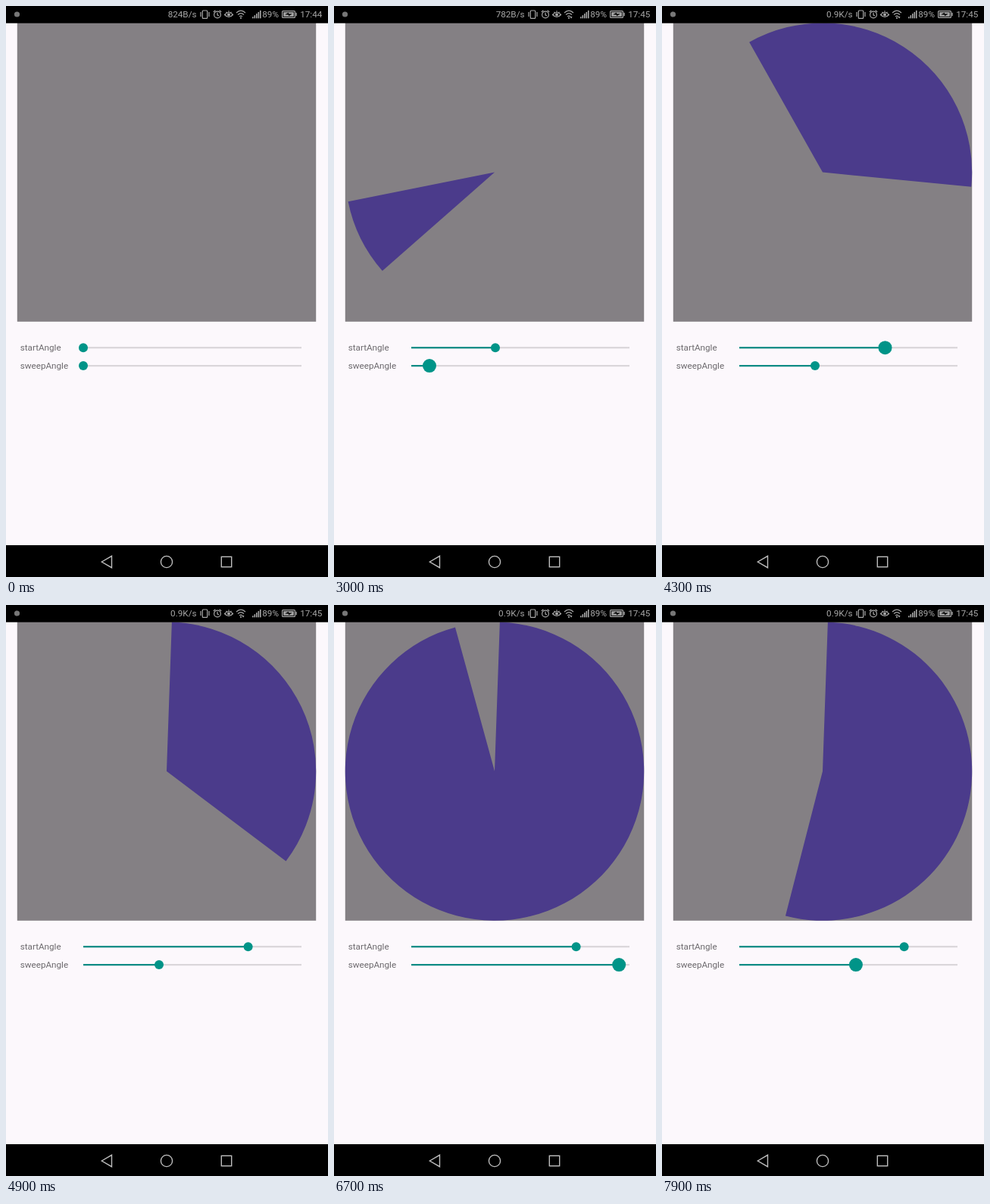
These frames come from a looping animation (425 by 754 pixels, 8 s). An HTML page:

```html
<!DOCTYPE html>
<html lang="en">
<head>
<meta charset="utf-8">
<title>Arc angles</title>
<style>
  html, body { margin: 0; width: 100%; height: 100%; overflow: hidden; background: #fcf8fc; }
  svg { display: block; width: 100vw; height: 100vh; }
  text { font-family: Roboto, "Open Sans", sans-serif; font-size: 11.7px; }
  .status text { fill: #a8a8a8; }
  .label { fill: #6c696d; }
  .line { fill: none; stroke: #a8a8a8; stroke-width: 1.2; }
  .nav { fill: none; stroke: #bdbdbd; stroke-width: 1.4; }
</style>
</head>
<body>
<svg viewBox="0 0 425 754" xmlns="http://www.w3.org/2000/svg">
  <rect width="425" height="754" fill="#fcf8fc"/>
  <rect x="14.8" y="22" width="394.4" height="394.8" fill="#848084"/>
  <path id="fan" fill="#4b3b8b"/>

  <g class="status">
    <rect width="425" height="22.7"/>
    <circle cx="14.5" cy="11" r="3.6" fill="#777"/>
    <text id="rate" x="251.5" y="15.2" text-anchor="end"></text>
    <g class="line">
      <rect x="259.3" y="6" width="6.4" height="10.4" rx="1"/>
      <path d="M257 8v6M268 8v6"/>
      <circle cx="279" cy="11.5" r="4.4"/>
      <path d="M279 8.8v3l2 1.2M273.8 8l2.6-2.3M284.2 8l-2.6-2.3"/>
      <path d="M288.5 11.5q5.500-6 11 0q-5.500 6-11 0zM290.500 7.800l1 1.400M294 6.200v1.600M297.500 7.800l-1 1.400"/>
      <path d="M304 9q6-5.600 12 0M306 11.500q4-3.600 8 0M308 13.900q2-1.700 4 0"/>
    </g>
    <circle cx="294" cy="11.5" r="1.9" fill="#a8a8a8"/>
    <circle cx="310" cy="15.8" r="1.1" fill="#a8a8a8"/>
    <path id="traffic" d="M311.500 14h3l-1.500 2.800z" fill="#a8a8a8"/>
    <g id="signal" fill="#a8a8a8"></g>
    <text x="338.3" y="15.2">89%</text>
    <rect class="line" x="364.600" y="6.600" width="16.800" height="8.800" rx="1"/>
    <rect x="366.200" y="8.200" width="13.600" height="5.600" fill="#a8a8a8"/>
    <path d="M368 11.300l5-2.600v1.600l5 .3-5 2.700v-1.600z"/>
    <rect x="382.400" y="8.800" width="1.400" height="4.400" fill="#a8a8a8"/>
    <text id="clock" x="417.300" y="15.200" text-anchor="end"></text>
  </g>

  <text class="label" x="18.700" y="455">startAngle</text>
  <text class="label" x="18.700" y="479">sweepAngle</text>
  <g id="sliders"></g>

  <rect y="712" width="425" height="42"/>
  <g class="nav">
    <path d="M126.300 734L139.500 726.300V741.700Z"/>
    <circle cx="212" cy="734" r="7.600"/>
    <rect x="284.300" y="727.300" width="13.400" height="13.400"/>
  </g>
</svg>
<script>
const LOOP = 8000, STEP = 100;
const CX = 212, CY = 219.6, R = 197.2;
const TRACK_X = 102, PX_PER_DEG = 0.8;
const SMALL = 6, BIG = 9;

// [time in ms, value] pairs
const startKeys = [
  [1200, 0], [1400, 18], [1800, 128], [1900, 138.7],
  [3900, 138.7], [4100, 180], [4300, 240.6], [4600, 268], [4700, 272]
];
const sweepKeys = [
  [2800, 0], [3000, 30], [3500, 203.9], [3600, 226], [3700, 206], [3900, 125],
  [5000, 125], [5100, 111], [5200, 148], [5300, 196], [5400, 251.6],
  [5900, 266], [6700, 342.7], [6800, 342.7], [7500, 110.5],
  [7700, 110.5], [7800, 150], [7900, 192.4]
];
const startThumb = [
  [1200, SMALL], [1400, BIG], [1900, BIG], [2100, SMALL],
  [3900, SMALL], [4100, BIG], [4700, BIG], [4900, SMALL]
];
const sweepThumb = [
  [2800, SMALL], [3000, BIG], [3800, BIG], [4000, SMALL],
  [5000, SMALL], [5200, 8], [5400, 6.5], [5600, BIG]
];

const byId = id => document.getElementById(id);

function add(parent, tag, attrs) {
  const el = document.createElementNS("http://www.w3.org/2000/svg", tag);
  set(el, attrs);
  parent.appendChild(el);
  return el;
}

function set(el, attrs) {
  for (const name in attrs) el.setAttribute(name, attrs[name]);
}

function valueAt(keys, t) {
  if (t <= keys[0][0]) return keys[0][1];
  for (let i = 1; i < keys.length; i++) {
    const [t0, a] = keys[i - 1], [t1, b] = keys[i];
    if (t <= t1) return a + (b - a) * (t - t0) / (t1 - t0);
  }
  return keys[keys.length - 1][1];
}

function makeSlider(y) {
  const parent = byId("sliders");
  const bar = { x: TRACK_X, y: y - 1.1, height: 2.2 };
  add(parent, "rect", { ...bar, width: 288, fill: "#dad6da" });
  const fill = add(parent, "rect", { ...bar, fill: "#0c8c84" });
  const thumb = add(parent, "circle", { cy: y, fill: "#009488" });
  return (angle, radius) => {
    const width = angle * PX_PER_DEG;
    set(fill, { width });
    set(thumb, { cx: TRACK_X + width, r: radius });
  };
}

function rimPoint(deg) {
  const a = deg * Math.PI / 180;
  return `${CX + R * Math.cos(a)} ${CY + R * Math.sin(a)}`;
}

function fanPath(start, sweep) {
  if (sweep <= 0) return "";
  const large = sweep > 180 ? 1 : 0;
  return `M${CX} ${CY}L${rimPoint(start)}A${R} ${R} 0 ${large} 1 ${rimPoint(start + sweep)}Z`;
}

for (let i = 0; i < 5; i++) {
  const height = 2 + i * 2.1;
  add(byId("signal"), "rect", { x: 325 + i * 2.5, y: 16.3 - height, width: 1.6, height });
}
const setStart = makeSlider(451.2);
const setSweep = makeSlider(475.1);

function draw(t) {
  const start = valueAt(startKeys, t), sweep = valueAt(sweepKeys, t);
  set(byId("fan"), { d: fanPath(start, sweep) });
  setStart(start, valueAt(startThumb, t));
  setSweep(sweep, valueAt(sweepThumb, t));
  byId("rate").textContent = t < 800 ? "824B/s" : t < 3900 ? "782B/s" : "0.9K/s";
  byId("clock").textContent = t < 2700 ? "17:44" : "17:45";
  set(byId("traffic"), { opacity: t < 300 || t >= 5100 && t < 6000 ? 0 : 1 });
}

function tick() {
  draw(Math.floor(performance.now() % LOOP / STEP) * STEP);
  requestAnimationFrame(tick);
}
tick();
</script>
</body>
</html>
```
